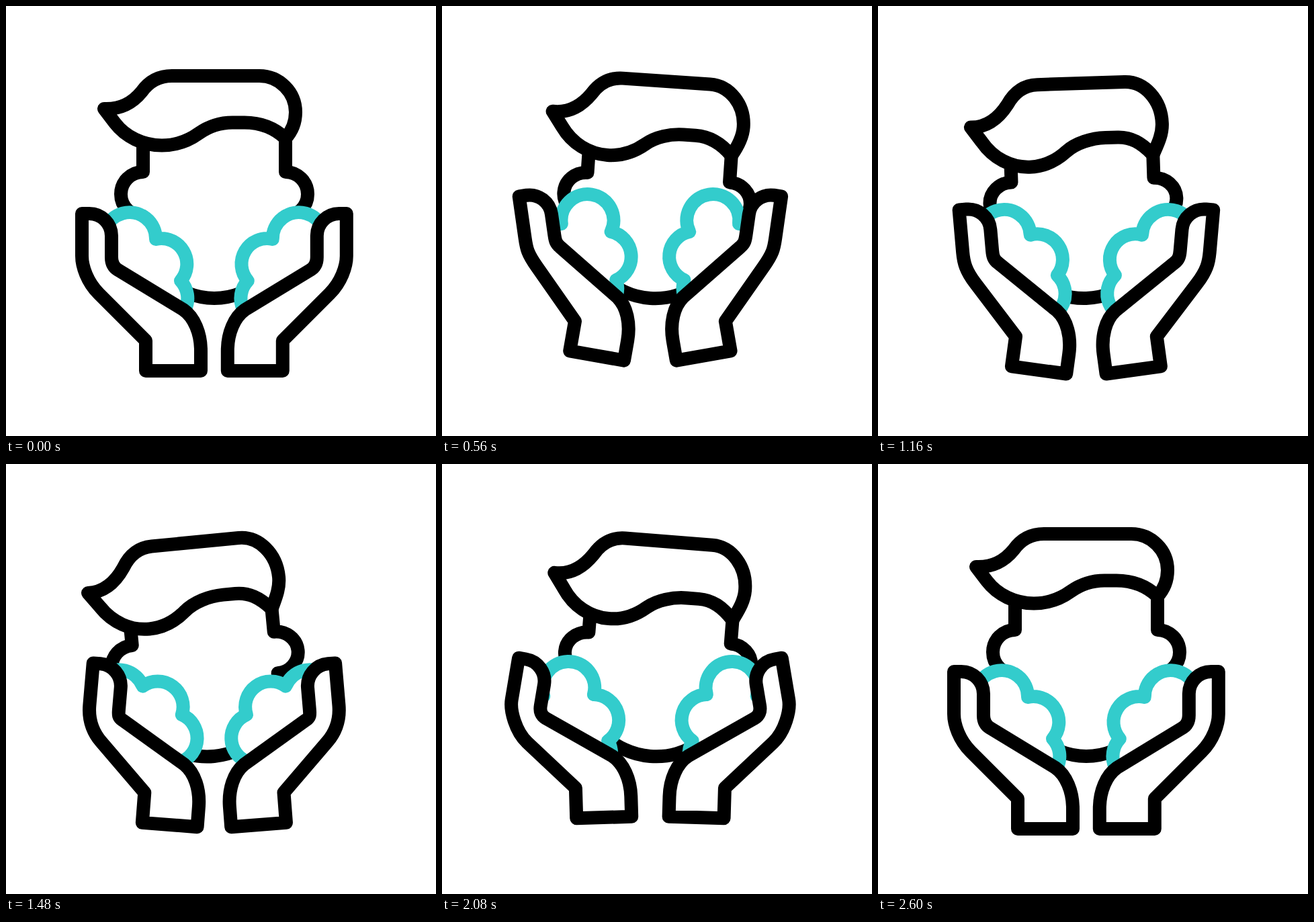
Animation, 640 px wide and 640 px high, one loop 3000 ms. Source, as an HTML page:

```html
<!DOCTYPE html>
<html lang="en">
<head>
<meta charset="utf-8">
<title>Face washing</title>
<style>
  html, body { margin: 0; width: 100%; height: 100%; overflow: hidden; background: #fff; }
  svg { display: block; width: 100%; height: 100%; }
  path { fill: #fff; stroke: #000; stroke-width: 20; stroke-linejoin: round; vector-effect: non-scaling-stroke; }
  .foam { stroke: #33cccc; }
</style>
</head>
<body>
<svg viewBox="0 0 640 640">
  <path id="head" d="M204 195V247A33 33 0 0 0 204 313V329A106 106 0 0 0 416 329V313A33 33 0 0 0 416 247V195"/>
  <path id="hair"/>
  <g id="side">
    <path class="foam" d="M130 380L151 367A39 39 0 1 1 223 347A38 38 0 0 1 260 409A38 38 0 0 1 230 473"/>
    <path class="hand"/>
  </g>
  <g id="mirror" transform="translate(619.8 0) scale(-1 1)"></g>
</svg>
<script>
const LOOP = 3000;
const $ = id => document.getElementById(id);

$('mirror').innerHTML = $('side').innerHTML;
const foams = document.querySelectorAll('.foam');
const hands = document.querySelectorAll('.hand');

// Tracks are lists of [time, value], eased between neighbours.
const beats = (...v) => [0, ...v, 0].map((x, i) => [200 + 600 * i, x]);
const tracks = {
  tilt: beats(6, -6, 4.8),
  nod: beats(1, 1, 1),
  foamX: beats(20, -9, 5),
  foamY: beats(15, -18.5, 14.6),
  foamTurn: beats(38, -25, 14.5),
  x: [[200, 0], [500, -1], [900, 5], [1400, 4], [1900, -15.5], [2400, 0]],
  y: [[200, 0], [680, -24.5], [1270, 2.5], [1870, -26], [2400, 0]],
  turn: [[200, 0], [760, 14], [1400, 4.9], [1900, -2.2], [2500, 0]],
  bend: [[200, 0], [850, -31], [1400, -0.5], [1900, 13.5], [2600, 0]],
  curl: [[200, 0], [520, 3], [850, 0], [1400, 3.5], [1850, 0]]
};

function at(keys, t) {
  if (t <= keys[0][0]) return keys[0][1];
  for (let i = 1; i < keys.length; i++) {
    const [t0, a] = keys[i - 1], [t1, b] = keys[i];
    if (t < t1) {
      const p = (t - t0) / (t1 - t0);
      return a + (b - a) * p * p * (3 - 2 * p);
    }
  }
  return keys[keys.length - 1][1];
}

function rotate([x, y], [cx, cy], deg) {
  const r = deg * Math.PI / 180, c = Math.cos(r), s = Math.sin(r);
  return [cx + (x - cx) * c - (y - cy) * s, cy + (x - cx) * s + (y - cy) * c];
}

// The palm turns about its middle, the fingers bend at the knuckle and curl in.
const PALM = [250, 440], KNUCKLE = [157, 387];

function handPath(s) {
  const palm = (x, y) => {
    const [a, b] = rotate([x, y], PALM, s.turn);
    return (a + s.x).toFixed(2) + ' ' + (b + s.y).toFixed(2) + ' ';
  };
  const finger = (x, y) => {
    const [a, b] = rotate([x, y], KNUCKLE, s.bend);
    return palm(a + s.curl, b + s.curl);
  };
  return 'M' + finger(113, 309) + 'L' + finger(124, 309) +
    'C' + finger(142.2, 309) + finger(157, 323.8) + finger(157, 342) +
    'L' + finger(157, 374) +
    'C' + finger(157, 382) + palm(160, 389) + palm(167, 393) +
    'L' + palm(264, 452) +
    'C' + palm(280, 463) + palm(290, 487) + palm(290, 513) +
    'L' + palm(290, 543) + 'L' + palm(208, 543) + 'L' + palm(208, 498) + 'L' + palm(138, 428) +
    'C' + palm(121, 411) + finger(113, 388) + finger(113, 372) + 'Z';
}

// Nodding lowers the tip, flattens the nape and pushes the fringe along.
const hairPath = n => `M146 ${153 + 2 * n}C169 ${154 + 2 * n} 187 146 202 127.5
  C213 112 228 104 247 104H377A54 54 0 0 1 431 158C431 173 ${426 - 4 * n} 186 416 197
  C399 181 ${378 + 6 * n} 173.5 ${355 + 9 * n} 173.5H${337 + 9 * n}
  C${319 + 6 * n} 173.5 302 179 287 189.5C271 201 253 207.5 232 207.5C204 207.5 178 195 162 174Z`;

const stretch = (y, shift, k) => `translate(0 ${y + shift}) scale(1 ${k}) translate(0 ${-y})`;

function draw(t) {
  const s = {};
  for (const k in tracks) s[k] = at(tracks[k], t);

  const lean = `rotate(${s.tilt} 310 435) `;
  $('head').setAttribute('transform', lean + stretch(435, 0, 1 - 0.064 * s.nod));
  $('hair').setAttribute('transform', lean + stretch(104, 11 * s.nod, 1 + 0.18 * s.nod));
  $('hair').setAttribute('d', hairPath(s.nod));

  const drift = `translate(${s.x + s.foamX} ${s.y + s.foamY}) rotate(${s.foamTurn} 231 384)`;
  foams.forEach(f => f.setAttribute('transform', drift));
  const d = handPath(s);
  hands.forEach(h => h.setAttribute('d', d));
}

const start = performance.now();
function tick() {
  draw((performance.now() - start) % LOOP);
  requestAnimationFrame(tick);
}
tick();
</script>
</body>
</html>
```
